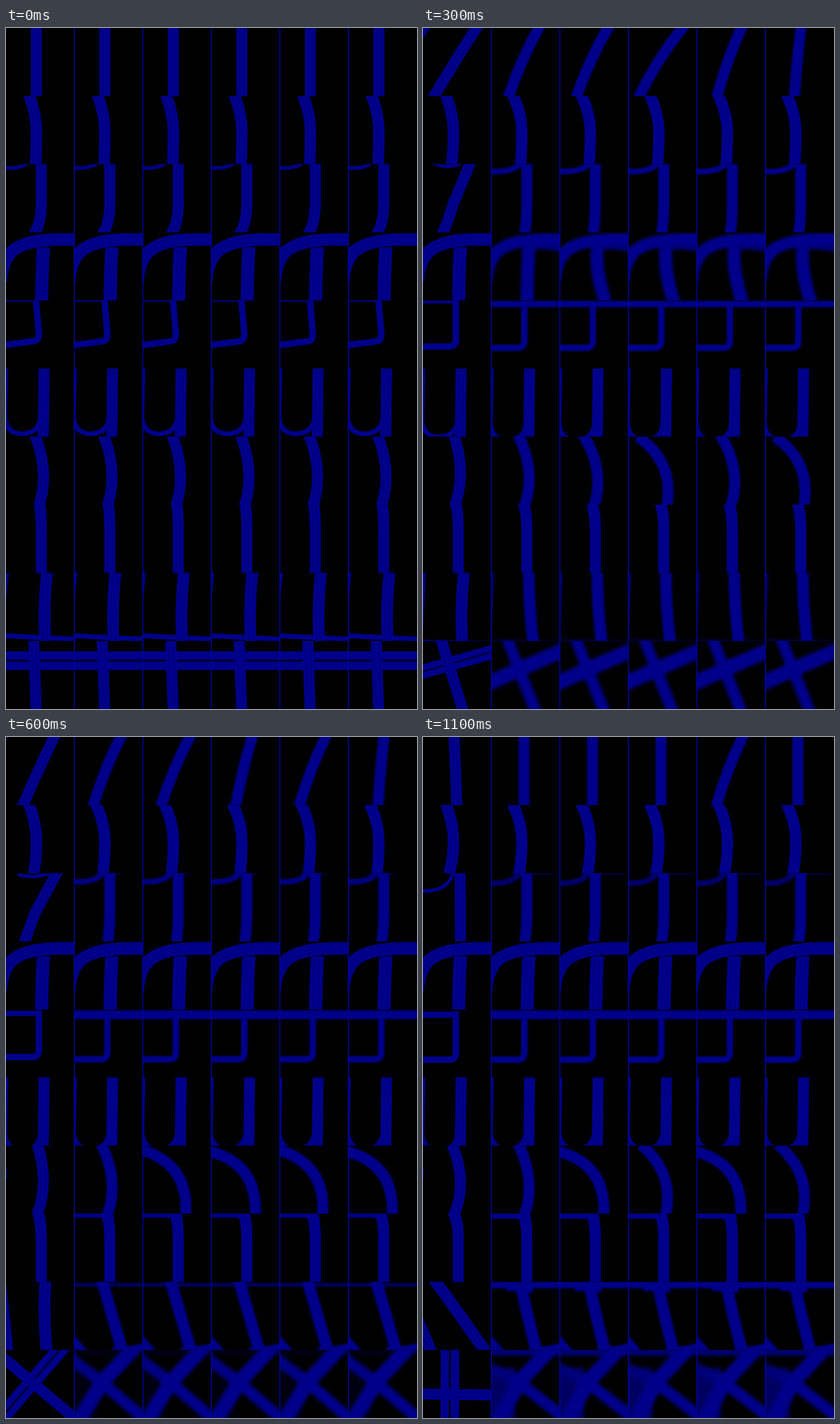
An HTML page that plays this animation: 582 px wide and 963 px high, repeating every 1.2 s.

```html
<!DOCTYPE html>
<html lang="en">
<head>
<meta charset="utf-8">
<title>Lane grid</title>
<style>
  html, body { margin: 0; width: 100%; height: 100%; overflow: hidden; background: #000; }
  svg { display: block; }
  path { fill: none; stroke-linecap: square; stroke-linejoin: round; }
</style>
</head>
<body>
<svg id="stage" width="582" height="963" viewBox="0 0 582 963"></svg>
<script>
const W = 97, H = 96.3, COLS = 6, STEP_MS = 100, STEPS = 12;
const LANE = '#00008b', DIVIDER = '#00009a';
let step = 0;

// Smooth rise from 0 to 1 between two steps.
function ramp(from, to) {
  const x = Math.min(1, Math.max(0, (step - from) / (to - from)));
  return x * x * (3 - 2 * x);
}
// Rises, then falls back to 0.
const pulse = (a, b, c, d) => ramp(a, b) * (1 - ramp(c, d));

const road = (d, width, opacity = 1, color = LANE) => ({ d, width, opacity, color });

// Quadratic curve that passes through its middle point.
const through = (x0, y0, mx, my, x1, y1) =>
  `M${x0} ${y0}Q${2 * mx - (x0 + x1) / 2} ${2 * my - (y0 + y1) / 2} ${x1} ${y1}`;

// Half line that leaves a point at an angle.
function arm(x, y, degrees) {
  const a = degrees * Math.PI / 180;
  return `M${x} ${y}l${130 * Math.cos(a)} ${130 * Math.sin(a)}`;
}

// Whole line through a point, moved sideways by offset.
function ray(x, y, degrees, offset = 0) {
  const a = degrees * Math.PI / 180;
  const px = x - Math.sin(a) * offset, py = y + Math.cos(a) * offset;
  return arm(px, py, degrees) + arm(px, py, degrees + 180);
}

function slant(c) {
  const peak = [60, 46, 48, 66, 37, 10][c];
  const fall = c === 3 ? ramp(3, 8) : c === 4 ? 0 : ramp(5, 9);
  const tilt = c
    ? peak * ramp(.5, 3.5) * (1 - fall)
    : peak * ramp(0, 3) - 16 * ramp(3, 5) - 52 * ramp(6, 12);
  const mid = 43 + 3 * ramp(0, 4), bend = c ? tilt * .1 : 0;
  const line = dx => `M${mid + tilt / 2 + dx} 0Q${mid - bend + dx} 46 ${mid - tilt / 2 + dx} 97`;
  const out = [road(line(0), 15.5)];
  if (!c) out.push(road(line(-75), 15.5));
  return out;
}

function bulge(c) {
  const drift = step / 11;
  return [road(`M${c ? 33 - 2 * ramp(0, 2) : 33} 0Q44 28 43 56Q43 75 ${42 - (c ? 3 : 5) * drift} 97`, 16)];
}

function hook(c) {
  if (c) {
    const y = 5 + 5 * ramp(0, 2) + 4 * ramp(4, 8), grow = ramp(0, 2);
    return [
      road(`M50 0L50 55Q50 82 ${41 + 6 * grow} 97`, 15.5),
      road(`M-3 ${y}Q${18 + 11 * grow} ${y + 2} ${30 + 10 * grow} 0`, 5 + 3 * grow, 1 - .25 * ramp(4, 10)),
      road(`M30 0H${35 + 5 * step}`, 4, .5 * ramp(0, 8))
    ];
  }
  const swing = pulse(0, 5, 5, 9), settle = ramp(5, 8.5);
  const top = 50 + 25 * swing + 2.5 * settle;
  const mid = 50 - 11 * swing + 3 * settle;
  const end = 41 - 20 * swing + 12 * settle;
  const y = 5 - 7 * ramp(0, 3) + 27 * ramp(5, 9);
  return [
    road(`M${top} 0L${mid} 56Q${mid + (mid - top) * .3} 80 ${end} 97`, 15.5),
    road(`M${25 * swing - 2} ${y}Q${18 + 25 * swing + 17 * settle} ${Math.max(y + 2, 6 + 3 * swing)} ${30 + 36 * swing + 13 * settle} -1`, 5)
  ];
}

function arch(c) {
  const arc = 'M-7 62C-5 25 22 11 72 10H98';
  const shift = c > 1 ? 13 * pulse(2, 3, 3, 5) : 0;
  const haze = c ? pulse(0, 2, 3, 5) : 0;
  return [
    road(`M52.5 30Q51 55 ${50.5 + shift} 97`, 18.5),
    road(arc, 20.5, .4, '#000'),
    road(arc, 17.5),
    road('M55 14Q78 12 102 18', 22, .8 * haze)
  ];
}

function box(c) {
  const grow = c ? ramp(0, 5) : ramp(0, 9), lean = 4 * (1 - ramp(0, 2));
  const base = 63 + 8 * (c ? ramp(-1, 7) : step / 11), right = base - 1.3 * lean;
  const y = .5 + 7 * grow;
  return [
    road(`M${46.5 - lean} ${y}L46.5 ${right - 11}Q47 ${right} 37 ${right}L-2 ${base}`, 9),
    road(`M-2 ${y}H${46 - lean}`, 2.5 + (c ? 10 : 6.5) * grow),
    road(`M45 ${y}H100`, 2.5 + 10 * grow, c ? ramp(0, 3) : 0)
  ];
}

function cup(c) {
  const drop = c ? 9 * ramp(0, 2) : 11 * ramp(0, 7);
  return [
    road('M54 0L52.8 97', 15.5),
    road(`M0 0L-1.5 ${68 + drop}Q0 ${92 + drop} 22 ${92.5 + drop}Q44 ${92 + drop} 48 ${74 + drop}`, 6.5)
  ];
}

// Even columns bend and stay; odd ones partly swing back.
function sway(c) {
  const bend = c < 2 ? 0 : c % 2 ? ramp(1, 5) * (1 - .6 * ramp(c + 3, c + 6)) : ramp(2, 7);
  const top = c ? 42 - 3 * ramp(0, 2) : 42 + 3 * pulse(0, 4, 6, 10);
  const end = 47 + 15 * bend - (c ? 0 : 2.5 * ramp(0, 5));
  const out = [road(through(top * (1 - bend), 9 * bend, 53 - 5 * bend, 50 - 10 * bend, end, 97), 15.5)];
  if (!c) out.push(road(`M${4 * ramp(0, 5) - 9} 29q6 11 0 22`, 7));
  return out;
}

function post(c) {
  const out = [road(`M${48 - (c ? 2 * ramp(0, 2) : 4 * step / 11)} 0Q50 10 50 35V97`, 15.5)];
  if (c) {
    const y = 1 + 2.5 * ramp(4, 9);
    out.push(road(`M-3 ${y}H34Q46 ${y} 47 18`, 7, ramp(3, 5)));
  }
  return out;
}

function fork(c) {
  const turn = c ? ramp(1, 7) : ramp(5, 12), settle = c ? ramp(7, 10) : 0;
  const top = 58 - (c ? 20 : 42) * turn + 3 * settle;
  const end = 55.5 + (c ? 13 : 34) * turn - 5 * settle;
  const out = [
    road(through(top, 0, (top + end) / 2 - 2 * (1 - turn) - settle, 48, end, 97), 16.5),
    road(`M${-4 - 26 * ramp(5, 9)} 0L${25 * ramp(0, 10) - 14} 97`, 16, c ? 1 - ramp(2, 5) : 1)
  ];
  const sink = 10 * ramp(0, 5);
  out.push(road(`M-3 ${89 + sink}L100 ${94 + sink / 2}`, 7 - 5 * ramp(0, 2)));
  if (c) {
    const late = ramp(4, 7);
    out.push(
      road('M-3 4H100', 5 + 5 * ramp(6, 9), late),
      road('M25 9Q42 9 55 11', 8, ramp(6, 9)),
      road('M-8 78Q2 88 12 100', 13, ramp(3, 5)),
      road('M58 97Q78 97 99 91', 9, ramp(3, 6))
    );
  }
  return out;
}

function crossing(c) {
  if (!c || step < 1) {
    const angle = -90 * ramp(0, 11.3), y = 28 + 4 * ramp(0, 2) + 16 * ramp(4, 7), x = 40 - 2 * ramp(3, 7);
    const half = 7.3 - 1.8 * pulse(0, 2, 5, 8), width = half * 1.6;
    return [
      road(ray(41, 48 + 15 * ramp(5, 11), 88 + .97 * angle), 15.5),
      road(ray(x, y, angle, -half), width),
      road(ray(x, y, angle, half), width),
      road(ray(x, y, angle), 1, .7)
    ];
  }
  // Four arms turn around one hub until they form a Y.
  const x = 39, y = 30 + 16 * ramp(0, 5), late = ramp(5, 9);
  return [
    road('M14 45V80', 40, .7 * late),
    road('M-3 3H100', 10, .85 * late),
    road(arm(x, y, -47 * ramp(0, 6)), 21),
    road(arm(x, y, 180 - 62 * ramp(0, 7)), 21),
    road(arm(x, y, -92 - 60 * ramp(0, 8)), 16, 1 - .4 * late),
    road(arm(x, y, 88 - 50 * ramp(0, 7)), 16.5)
  ];
}

const rows = [
  [slant, 1], [bulge, .7], [hook, 1], [arch, 0], [box, 1],
  [cup, .7], [sway, 1.1], [post, .7], [fork, 1.6], [crossing, 2.6]
];

const pathTag = r => r.opacity <= 0 ? '' :
  `<path d="${r.d}" stroke="${r.color}" stroke-width="${r.width}" opacity="${r.opacity}"/>`;

// Faint lane markings on sharp, wide roads.
const markings = r => r.width < 13 || r.color !== LANE || r.opacity < 1 ? '' :
  pathTag(road(r.d, r.width * .5, .14, '#000')) + pathTag(road(r.d, r.width * .5 - 2));

function cell([draw, softness], r, c) {
  const blur = !c ? 0 : draw === arch ? 2.2 * pulse(0, 2, 3, 5) : softness * ramp(0, 3);
  const roads = draw(c);
  const body = roads.map(pathTag).join('') + (blur < .45 ? roads.map(markings).join('') : '');
  const style = blur ? ` style="filter:blur(${blur}px)"` : '';
  return `<svg x="${c * W}" y="${r * H}" width="${W}" height="${H}" overflow="hidden"><g${style}>${body}</g></svg>`;
}

const stage = document.getElementById('stage');
function render() {
  let html = '';
  rows.forEach((row, r) => {
    for (let c = 0; c < COLS; c++) html += cell(row, r, c);
  });
  for (let c = 1; c < COLS; c++)
    html += `<rect x="${c * W - 1}" width="1.5" height="963" fill="${DIVIDER}"/>`;
  stage.innerHTML = html;
}

const start = performance.now();
let shown = -1;
function tick() {
  step = Math.floor((performance.now() - start) / STEP_MS) % STEPS;
  if (step !== shown) {
    shown = step;
    render();
  }
  requestAnimationFrame(tick);
}
tick();
</script>
</body>
</html>
```
